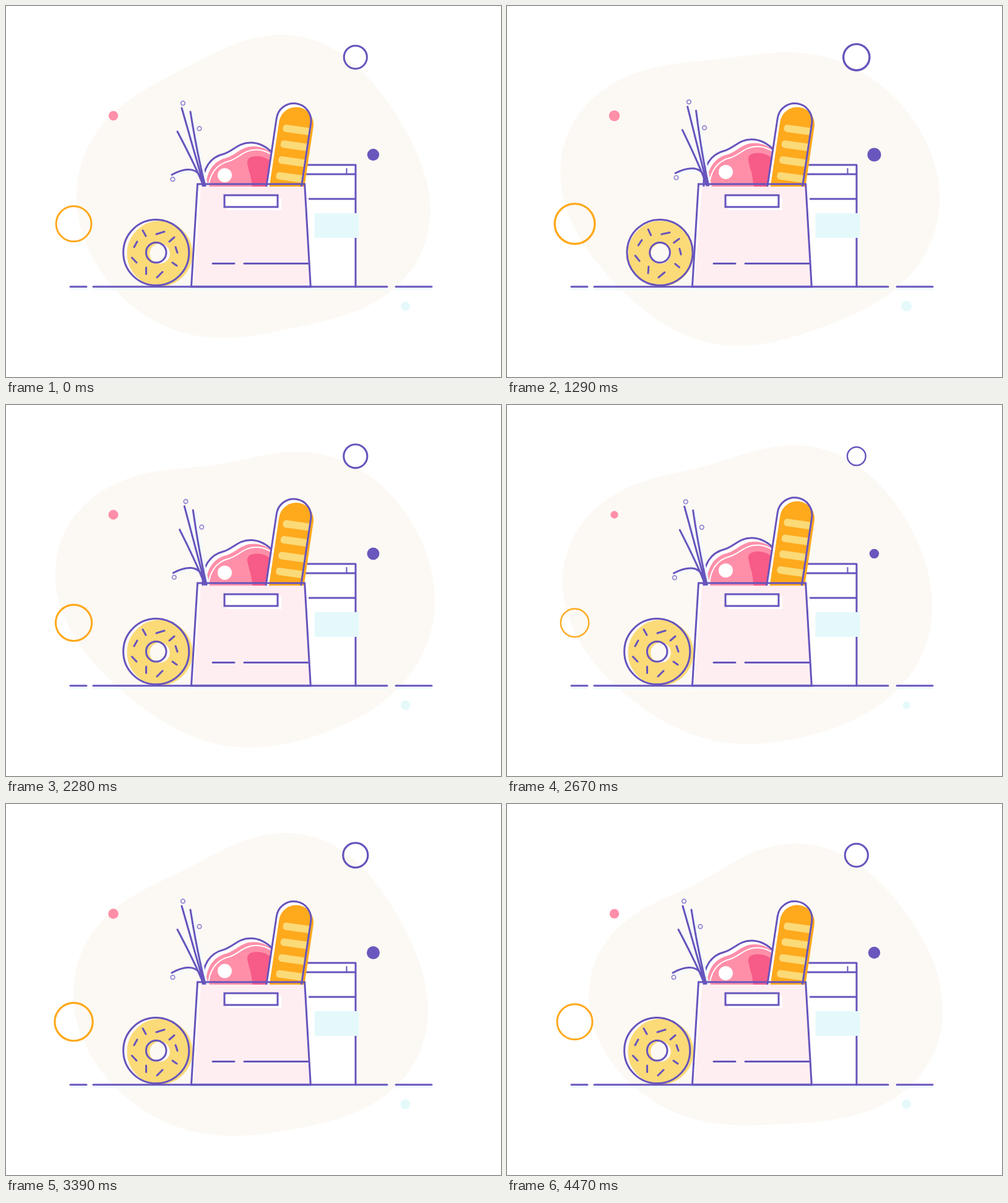
An HTML page for the animation above (4.5 s loop, 800 by 600 pixels).

```html
<!DOCTYPE html>
<html lang="en">
<head>
<meta charset="utf-8">
<title>Groceries</title>
<style>
  html, body { margin: 0; width: 100%; height: 100%; overflow: hidden; background: #fff; }
  svg { display: block; width: 800px; height: 600px; }
  .line { fill: none; stroke: #6754bd; stroke-width: 3; stroke-linecap: round; stroke-linejoin: round; }
  .ghost { fill: none; stroke: #f0fafc; stroke-width: 3; stroke-linecap: round; }
  .ring { fill: none; stroke-width: 3; }
  .orange { fill: #ffa91c; }
  .yellow { fill: #fbda78; }
  .pink { fill: #ff8fa9; }
  .cyan { fill: #e5f9fb; }
  .white { fill: #fff; }
  .bud { fill: none; stroke: #9388d3; stroke-width: 1.7; }
</style>
</head>
<body>
<svg viewBox="0 0 800 600" xmlns="http://www.w3.org/2000/svg">
  <defs>
    <clipPath id="rim"><rect width="800" height="292.5"/></clipPath>
    <path id="loaf" d="M417.7 313L437.3 181.4A28 28 0 0 1 492.7 189.6L474.4 313"/>
    <clipPath id="crust"><use href="#loaf"/></clipPath>
    <path id="steak" d="M318 310V288C318 264 329 245 351 239.500C367 235 375 221 395 221C410 221 421 227 432 239V310"/>
    <path id="stalks" d="M284 165Q306 242 320 291M298 171Q309 240 322 291M277 203Q309 264 319 291M268 273C286 263 311 257 317 284"/>
    <path id="ground" d="M104 454H130M141 454H616M630 454H688"/>
  </defs>

  <path id="blob" fill="#fcf9f4"/>

  <g id="dots">
    <circle cx="109.5" cy="352.3" r="28.5" class="ring" stroke="#ffa91c"/>
    <circle cx="564.8" cy="82.8" r="18.6" class="ring" stroke="#6754bd"/>
    <circle cx="173.5" cy="177.5" r="7.7" class="pink"/>
    <circle cx="593.5" cy="240.5" r="9.7" fill="#6a57bd"/>
    <circle cx="645.5" cy="485.5" r="7.5" class="cyan"/>
  </g>

  <path class="white" d="M480 257H565V454H480Z"/>
  <path class="line" d="M480 257H565V454M480 272H565M480 312H565"/>
  <path class="line" style="stroke-width:2" d="M550.5 263V271"/>
  <path class="cyan" d="M498.5 335H570.5V375H498.5Z"/>

  <use href="#ground" class="ghost" y="4"/>

  <circle cx="248.5" cy="400.5" r="34.6" fill="none" stroke="#fbda78" stroke-width="36.6"/>
  <g id="donut" class="line">
    <circle cx="242.7" cy="398.7" r="53.1"/>
    <circle cx="242.7" cy="398.7" r="16.3"/>
    <path d="M221 363L226 372M243 369L256 365M264 381L272 374M274 390L277 399M269 415L276 420M253 430L244 439M226.5 423V433.5M203.5 407L211 415M207 390L212 381"/>
  </g>

  <g clip-path="url(#rim)">
    <g id="meat">
      <use href="#steak" class="white"/>
      <use href="#steak" class="pink" x="5" y="6"/>
      <path d="M390 255C389 245 397 243 406 243C418 243 427 249 434 257V310H401C397 293 398 281 393 268Z" fill="#f75b88"/>
      <use href="#steak" x="9" y="11.5" fill="none" stroke="#fff" stroke-width="2"/>
      <circle class="white" cx="353.5" cy="273.7" r="11.5"/>
      <use href="#steak" class="line"/>
    </g>
    <g id="grass">
      <use href="#stalks" class="ghost" x="4" y="3"/>
      <use href="#stalks" class="line"/>
      <g class="bud">
        <circle cx="286" cy="157.2" r="3.3"/>
        <circle cx="312.5" cy="198.2" r="3.3"/>
        <circle cx="269.5" cy="280.2" r="3.3"/>
      </g>
    </g>
    <g id="bread">
      <use href="#loaf" class="white"/>
      <use href="#loaf" class="orange" x="4" y="6"/>
      <g id="cuts" class="yellow" clip-path="url(#crust)"></g>
      <use href="#loaf" class="line"/>
    </g>
  </g>

  <path class="white" d="M309.5 292.5H488L497.5 453H299.5Z"/>
  <path d="M315 292.5H483.2L492.3 454H302.5Z" fill="#ffeef1"/>
  <path class="white" d="M353 306H439V310H445V330H357V325H353Z"/>
  <path class="line" style="stroke-linejoin:miter" d="M309.5 288H482.7L492.3 454H299.5ZM353 306H439V325H353Z"/>
  <path class="line" d="M334 416.5H369M385 416.5H488"/>
  <use href="#ground" class="line"/>
</svg>
<script>
const LOOP = 4500;
const TURN = 2 * Math.PI;
const $ = id => document.getElementById(id);
const { sin, cos, min, max } = Math;

// Straight rise from 0 to 1 and back.
const bump = (t, from, peak, to) =>
  max(0, min((t - from) / (peak - from), (to - t) / (to - peak)));

const pulse = t => 1
  - .2 * bump(t, 0, 600, 1010) + .36 * bump(t, 1010, 1750, 2320)
  - .21 * bump(t, 2320, 2650, 3195) + .12 * bump(t, 3195, 3500, 4250);
const sway = t => 1.98 * bump(t, 420, 1350, 3320);
const breadY = t => -3.5 * bump(t, 0, 680, 1290)
  - 8 * bump(t, 1450, 2650, 3390) - 3.5 * bump(t, 3390, 3950, LOOP);
const meatY = t => -6.3 * bump(t, 0, 1100, 2250) - 6.2 * bump(t, 2050, 2620, 4480);
const roll = t => 4.9 * bump(t, 800, 1250, 1600);

// A circle bent by four harmonics: one slow swing, then a drift to the right.
function blobPath(t) {
  const p = min(1, t / 3600);
  const c = cos(TURN * p), s = sin(TURN * p);
  const drift = max(0, (t - 3400) / 1100);
  const radius = a => 264.5 - 4.5 * c - 10 * drift
    + (4 * c - 2 + 22 * drift) * cos(a) + (5.5 - 4 * c - 3.5 * s + 6 * drift) * sin(a)
    + (30 - 8 * c + 10 * drift) * cos(2 * a) - (1.5 + 6 * c) * sin(2 * a)
    + (4 * s - 3 * p - 3.5) * cos(3 * a) + (10.5 * c - 1.5) * sin(3 * a)
    + 2.5 * cos(4 * a) + 8 * sin(4 * a);
  const steps = 120;
  const points = Array.from({ length: steps }, (_, i) => {
    const a = TURN * i / steps, r = radius(a);
    return `${(400 + r * cos(a)).toFixed(2)} ${(300 + r * sin(a)).toFixed(2)}`;
  });
  return `M${points.join("L")}Z`;
}

const move = (el, value) => el.setAttribute("transform", value);

$("cuts").innerHTML = [0, 1, 2, 3].map(i =>
  `<rect width="70" height="12" rx="5" transform="translate(${448.5 - 3.7 * i} ${191.2 + 25.6 * i}) rotate(8)"/>`
).join("");

const dots = [...$("dots").children];

function draw(t) {
  $("blob").setAttribute("d", blobPath(t));
  for (const dot of dots) {
    const x = dot.getAttribute("cx"), y = dot.getAttribute("cy");
    move(dot, `translate(${x} ${y}) scale(${pulse(t)}) translate(${-x} ${-y})`);
  }
  move($("grass"), `rotate(${sway(t)} 354 403)`);
  move($("bread"), `translate(0 ${breadY(t)})`);
  move($("meat"), `translate(0 ${meatY(t)})`);
  const x = roll(t);
  move($("donut"), `translate(${x} 0) rotate(${x / 53.1 * 360 / TURN} 242.7 398.7)`);
}

const start = performance.now();
function tick() {
  draw((performance.now() - start) % LOOP);
  requestAnimationFrame(tick);
}
tick();
</script>
</body>
</html>
```
